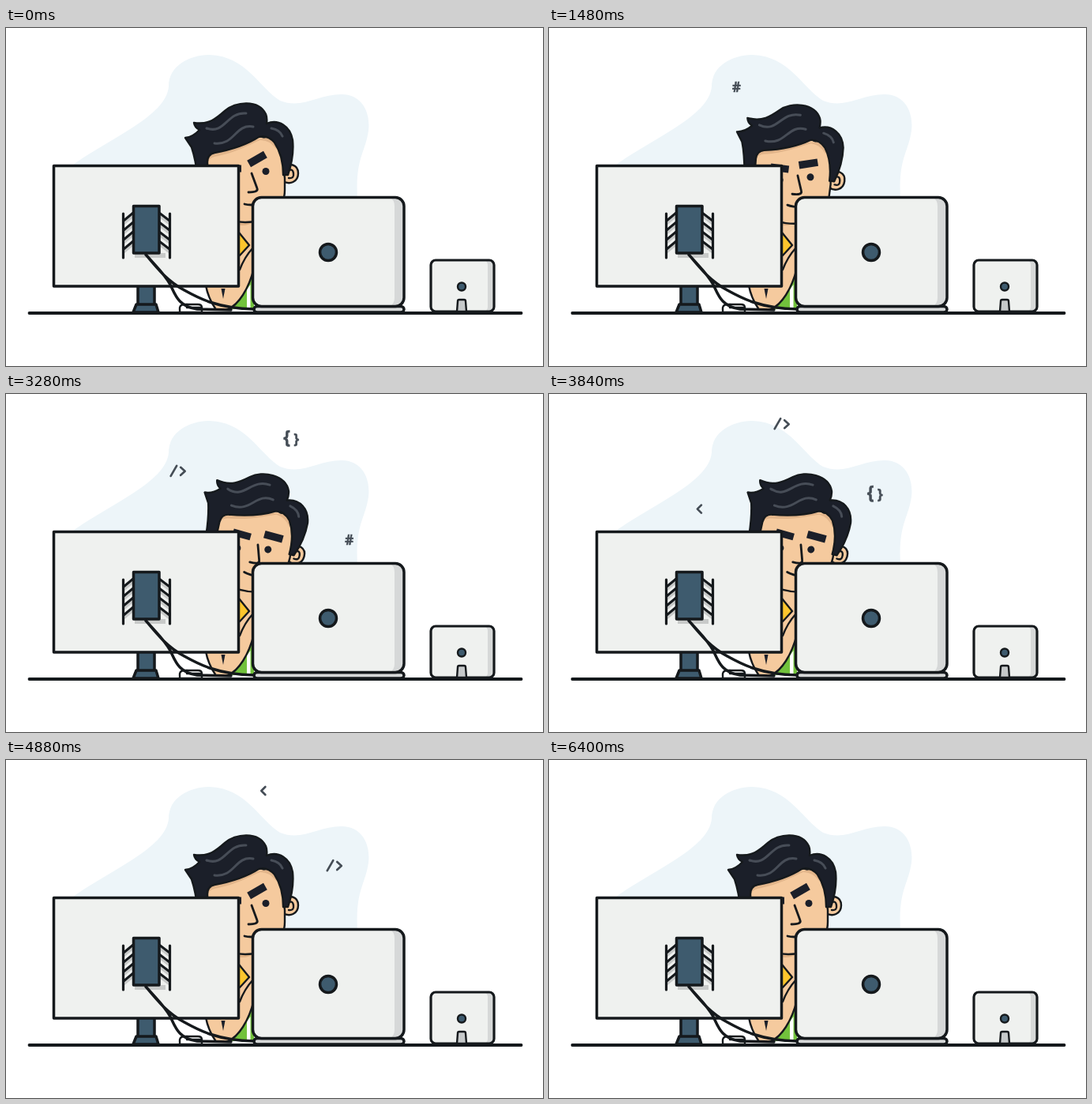
Animation of 680 by 428 pixels, one loop 6640 ms. Source, as an HTML page:

```html
<!DOCTYPE html>
<html lang="en">
<head>
<meta charset="utf-8">
<title>Developer at work</title>
<style>
  html, body { margin: 0; height: 100%; overflow: hidden; background: #fff; }
  svg { display: block; width: 680px; height: 428px; }
  .ink { stroke: #15191c; stroke-width: 3.5; stroke-linejoin: round; stroke-linecap: round; }
  .thin { stroke-width: 2.4; }
  .line { fill: none; }
  .skin { fill: #f5ca9e; }
  .panel { fill: #eff1ef; }
  .shade { fill: #d6d8d8; }
  .blue { fill: #3e5b6e; }
  .hair { fill: #1b1f29; }
  .shine { fill: none; stroke: #474d57; stroke-width: 3; stroke-linecap: round; }
  .symbol { fill: #454d56; font: bold 18px "Noto Sans Mono", "DejaVu Sans Mono", monospace; text-anchor: middle; }
  .symbol text { stroke: #454d56; stroke-width: 0.5; }
  .symbol path { fill: none; stroke: #454d56; stroke-width: 2.7; stroke-linecap: round; stroke-linejoin: round; }
</style>
</head>
<body>
<svg viewBox="0 0 680 428">
  <path fill="#edf5f9" d="M84 174C130 140 203 112 206 74C206 46 235 34 258 34C305 36 320 75 347 92C375 103 395 84 425 84C450 84 462 106 459 130C455 158 442 165 445 216L300 240L84 240Z"/>

  <path id="arc" fill="none" d="M165 230C175 165 205 112 226 87C250 58 280 36 308 37C375 37 416 120 438 195L450 235"/>
  <g class="symbol"><text y="6.5">#</text></g>
  <g class="symbol"><text x="-5.5" y="6" style="font-size:23px">{</text><text x="7" y="6" style="font-size:18px">}</text></g>
  <g class="symbol"><path d="M-9 6L-1.5 -7M3.5 -5L9 0L3.5 5"/></g>
  <g class="symbol"><path d="M2.5 -5L-2.5 0L2.5 5"/></g>

  <!-- body -->
  <path class="skin" d="M280 235H314V345L288 356H264Q257 345 253 326Z"/>
  <path fill="#dfb083" d="M280 240H313V246Q304 252 292 249Z"/>
  <path class="ink thin" fill="#fdc62d" d="M286 254L295 259L308 275L296 288L284 285Z"/>
  <path fill="#72c23c" d="M314 306Q309 324 300 338T281 356H314Z"/>
  <path fill="#fff" d="M305 331L309.500 325V357H305Z"/>
  <path class="ink thin line" d="M313 278Q302 290 296 306M253 326Q256 342 265 355M314 304Q309 324 300 338T281 356"/>
  <path class="hair" d="M272.500 330H277.500L275 343Z"/>

  <g id="head">
    <path class="ink thin skin" d="M351 178C358 169 370 173 370 184C370 195 359 199 351 194Z"/>
    <path class="ink thin line" d="M357 181Q363 177 364 184T358 190"/>
    <path class="ink thin skin" d="M250 150V200C256 234 282 246 303 246C333 246 353 230 353 205V190L347 145L300 130Z"/>
    <path fill="#e2b58a" d="M255 172Q256 165 264 163C292 158 311 146 322 142Q334 142 342 153L341 137L255 153Z"/>
    <path class="hair ink thin" d="M227 139Q237 138 245 129Q239 126 238 120C257 123 267 114 277 105C290 93 320 90 329 109Q331 114 330 121C345 115 360 124 363 142Q365 163 357 186H351C351 169 346 154 340 145Q331 135 320 138C306 147 286 154 264 158Q255 160 255 170L256 190H243Q240 166 235 151Z"/>
    <path class="shine" d="M254 127C278 135 279 106 304 108M264 146C290 149 290 121 313 125M336 127Q347 129 350 137"/>
    <path id="nose" class="ink line" style="stroke-width:2.8" d="M311 184L318 203Q320 208 307 208"/>
    <path class="ink line" style="stroke-width:2.8" d="M302 223Q309 225 323 223"/>
    <rect class="hair" x="275" y="173.500" width="23" height="9"/>
    <g id="brow"><rect class="hair" x="-12" y="-4.800" width="24" height="9.600"/></g>
    <g id="eyes" class="hair"><circle cx="329" cy="181.500" r="4.500"/><circle cx="291" cy="190" r="4.500"/></g>
  </g>

  <!-- desk, mouse -->
  <path class="ink thin" fill="#fff" d="M220 360V354Q221 350 226 350H243Q248 350 248 354V360Z"/>
  <path class="ink thin line" d="M229 350V354H248"/>

  <!-- monitor -->
  <path class="ink blue" d="M167 326H188V350H167ZM165 350H190L193 360H161Z"/>
  <rect class="ink panel" x="60.500" y="174.500" width="234" height="152.500"/>
  <path fill="#c8cac9" d="M163 285H202V291H163Z"/>
  <g id="ribs"></g>
  <path class="ink line" style="stroke-width:3.2" d="M148.500 235V291M207.500 235V291"/>
  <rect class="ink blue" x="161.500" y="225.500" width="32.500" height="59.500"/>
  <path class="ink line" d="M177 287C192 304 202 313 208 325S218 353 242 356L285 357M177 287C196 310 206 321 224 331S266 355 314 356"/>

  <!-- laptop -->
  <rect class="ink shade" x="314" y="352.500" width="190" height="7.500" rx="4"/>
  <rect class="panel" x="312.500" y="214.500" width="191.500" height="138" rx="11"/>
  <path class="shade" d="M486 215H493Q504 215 504 226V341Q504 352 493 352H486Q492 350 492 341V226Q492 217 486 215Z"/>
  <rect class="ink line" x="312.500" y="214.500" width="191.500" height="138" rx="11"/>
  <circle class="ink blue" cx="408" cy="284" r="10.500"/>

  <!-- small screen -->
  <rect class="panel" x="538" y="294" width="80" height="65" rx="6"/>
  <path class="shade" d="M606 294H612Q618 294 618 300V353Q618 359 612 359H606Q610 357 610 353V300Q610 296 606 294Z"/>
  <rect class="ink line" style="stroke-width:3.2" x="538" y="294" width="80" height="65" rx="6"/>
  <circle class="ink thin blue" cx="577" cy="327.500" r="5"/>
  <path class="ink thin" fill="#c6c9ca" d="M571 359L572 346Q572 344 574 344H580Q582 344 582 346L583 359Z"/>

  <path class="ink" style="stroke-width:3.8" d="M29.500 361H652.500"/>
</svg>
<script>
  const LOOP = 6640, STEP = 40, TURN = 15.4;
  const find = id => document.getElementById(id);
  const arc = find('arc'), length = arc.getTotalLength();
  const symbols = [...document.querySelectorAll('.symbol')];
  const delays = [1480, 2465, 3450, 4305];

  // Slanted ribs on both sides of the port, each with a soft shadow
  let ribs = '';
  for (let i = 0; i < 4; i++) {
    const y = 234 + i * 12;
    const d = `M161 ${y}L149 ${y + 10}M194 ${y}L207 ${y + 10}`;
    ribs += `<path d="${d}" transform="translate(0 4)" stroke="#c8cac9" stroke-width="3"/>
      <path d="${d}" class="ink" style="stroke-width:3"/>`;
  }
  find('ribs').innerHTML = ribs;

  const ease = (t, start, span) => {
    const p = Math.min(1, Math.max(0, (t - start) / span));
    return p * p * (3 - 2 * p);
  };
  const move = (node, value) => node.setAttribute('transform', value);

  function draw(t) {
    const turn = ease(t, 1240, 500) - ease(t, 4220, 500);
    move(find('head'), `translate(${-turn} ${turn}) rotate(${TURN * turn} 297 226)`);
    move(find('brow'), `translate(${318 + 8 * turn} ${166 + 4 * turn}) rotate(${-30 + 30 * turn})`);
    move(find('eyes'), `translate(${-5.5 * turn} ${6 * turn})`);
    move(find('nose'), `translate(${-1.5 * turn} ${turn})`);

    symbols.forEach((node, i) => {
      const u = t - delays[i];
      const d = length - 342 + 0.18 * u - 1.08e-5 * u * u;
      const shown = d > 0 && d < length;
      node.style.display = shown ? '' : 'none';
      if (!shown) return;
      const p = arc.getPointAtLength(d);
      move(node, `translate(${p.x} ${p.y})`);
    });
  }

  const began = performance.now();
  function tick() {
    const t = (performance.now() - began) % LOOP;
    draw(Math.floor(t / STEP) * STEP);
    requestAnimationFrame(tick);
  }
  tick();
</script>
</body>
</html>
```
